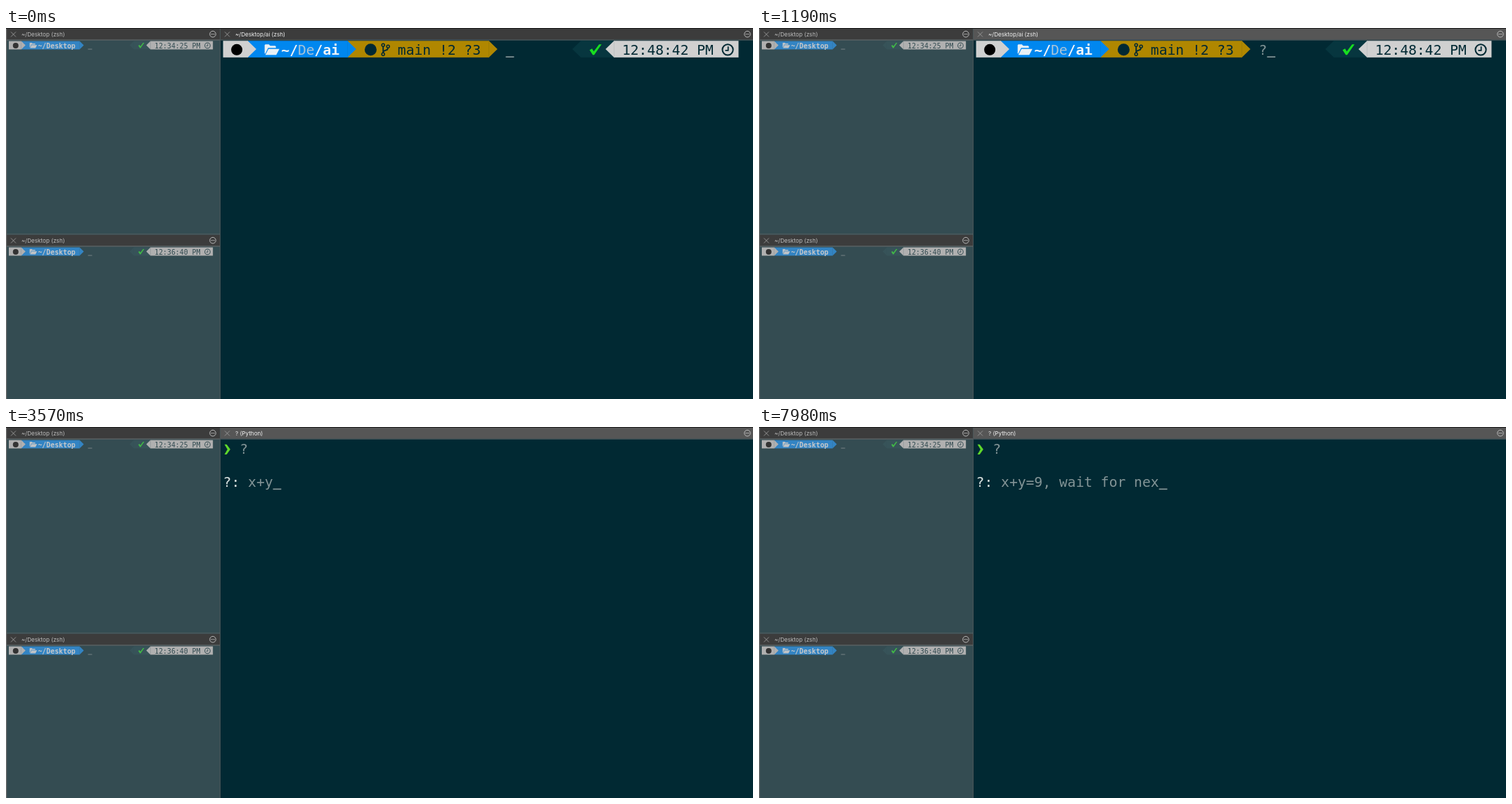
Animation of 1062x527 px, one loop 8000 ms. Source, as an HTML page with a canvas:

```html
<!DOCTYPE html>
<html lang="en">
<head>
<meta charset="utf-8">
<title>Terminal panes</title>
<style>
html, body { margin: 0; width: 100%; height: 100%; overflow: hidden; background: #012933; }
canvas { display: block; }
</style>
</head>
<body>
<canvas id="stage" width="1062" height="527"></canvas>
<script>
const ctx = document.getElementById('stage').getContext('2d');
const LOOP = 8000, COL = 11.82, ROW = 23.6;
const BG = '#012933', LIGHT = '#d0d0d0', BLUE = '#0087ef', GOLD = '#b08700', TEAL = '#07363f', GREY = '#839496';

// Typed line and the moment each character lands
const line = 'x+y=9, wait for nex';
const keyTimes = [2450, 3080, 3570, 4060, 4340, 4970, 5110, 5390, 5880, 6090,
  6230, 6440, 6580, 6720, 6790, 7280, 7490, 7630, 7980];

function rect(x, y, w, h, color) {
  ctx.fillStyle = color;
  ctx.fillRect(x, y, w, h);
}

function polygon(color, ...points) {
  ctx.fillStyle = color;
  ctx.beginPath();
  for (let i = 0; i < points.length; i += 2) ctx.lineTo(points[i], points[i + 1]);
  ctx.fill();
}

function stroke(color, width, ...points) {
  ctx.strokeStyle = color;
  ctx.lineWidth = width;
  ctx.beginPath();
  for (let i = 0; i < points.length; i += 2) ctx.lineTo(points[i], points[i + 1]);
  ctx.stroke();
}

function disc(x, y, r, color) {
  ctx.fillStyle = color;
  ctx.beginPath();
  ctx.arc(x, y, r, 0, 7);
  ctx.fill();
}

function ring(x, y, r, color, width) {
  ctx.strokeStyle = color;
  ctx.lineWidth = width;
  ctx.beginPath();
  ctx.arc(x, y, r, 0, 7);
  ctx.stroke();
}

// Terminal cell text; the origin is the top left of the pane's first cell
function mono(text, col, row, color, weight = 'normal') {
  ctx.font = weight + ' 19.64px "DejaVu Sans Mono", monospace';
  ctx.fillStyle = color;
  ctx.fillText(text, col * COL, row * ROW + 19.8);
}

function cursor(col, row) {
  rect(col * COL, row * ROW + 22, COL, 1.7, GREY);
}

// Segment with an arrow tip at its right (dir 1) or left (dir -1) end
function segment(from, to, color, dir) {
  rect(from * COL, 0, (to - from) * COL, ROW, color);
  const edge = (dir > 0 ? to : from) * COL;
  polygon(color, edge - dir * .3, 0, edge + dir * COL, ROW / 2, edge - dir * .3, ROW);
}

function folder(x) {
  polygon('#e8f0f6', x, 18, x, 6, x + 1, 5, x + 6, 5, x + 8, 7, x + 15, 7, x + 16, 8, x + 16, 10, x + 5, 10, x + 1, 18);
  polygon('#e8f0f6', x + 1, 20, x + 5.5, 11.5, x + 21, 11.5, x + 16.5, 20);
}

function branch(x) {
  ring(x + 3, 6, 2, BG, 1.5);
  ring(x + 3, 19, 2, BG, 1.5);
  ring(x + 10, 8, 2, BG, 1.5);
  stroke(BG, 1.8, x + 3, 8, x + 3, 17);
  stroke(BG, 1.8, x + 10, 10, x + 9, 12.5, x + 4, 14.5, x + 3, 17);
}

function prompt(git, rightCol, time) {
  const pathEnd = git ? 15 : 17;
  if (git) segment(pathEnd, 32, GOLD, 1);
  segment(3, pathEnd, BLUE, 1);
  segment(0, 3, LIGHT, 1);
  disc(19.5, 12.6, 8, '#000');
  folder(5 * COL);
  if (git) {
    mono('~/', 7, 0, '#f0f4f8', 'bold');
    mono('De', 9, 0, '#a9c4d8');
    mono('/ai', 11, 0, '#f0f4f8', 'bold');
    disc(17.75 * COL, 12.6, 8.5, BG);
    branch(19 * COL);
    mono('main !2 ?3', 21, 0, BG);
  } else {
    mono('~/Desktop', 7, 0, '#f0f4f8', 'bold');
  }

  const r = rightCol, x = (r + 2) * COL;
  segment(r + 1, r + 5, TEAL, -1);
  segment(r + 5, r + 20, LIGHT, -1);
  polygon('#18df20', x + 1, 13, x + 4.5, 11, x + 7, 15, x + 14.5, 5, x + 18, 5, x + 7.5, 20, x + 5.5, 20);
  mono(time, r + 6, 0, BG);
  ring((r + 18.7) * COL, 12.6, 7.6, BG, 2);
  stroke(BG, 1.8, (r + 18.7) * COL + .6, 8, (r + 18.7) * COL + .6, 13.6, (r + 18.7) * COL - 3.6, 13.6);
}

function titleBar(x, y, w, title, color, textColor) {
  rect(x, y, w, 15.5, color);
  rect(x, y + 15.5, w, 1, '#6b6b6b');
  stroke('#999', .9, x + 6.5, y + 4.5, x + 13.5, y + 11.5);
  stroke('#999', .9, x + 13.5, y + 4.5, x + 6.5, y + 11.5);
  ctx.font = '8.1px Inter, sans-serif';
  ctx.fillStyle = textColor;
  ctx.fillText(title, x + 21.5, y + 10.7);
  const cx = x + w - 10.5, cy = y + 7.7;
  ring(cx, cy, 4.3, '#c4c4c4', .9);
  for (const dx of [-2, 0, 2]) disc(cx + dx, cy, .7, '#c4c4c4');
}

function inPane(x, y, scale, draw) {
  ctx.save();
  ctx.translate(x, y);
  ctx.scale(scale, scale);
  draw();
  ctx.restore();
}

function sidePane(y, h, time) {
  rect(0, y, 304, h, BG);
  inPane(4, y + 17.6, .501, () => {
    prompt(false, 29, time);
    cursor(19, 0);
  });
  rect(0, y, 304, h, 'rgba(128,128,128,.4)');
  titleBar(.5, y, 304, '~/Desktop (zsh)', '#3c3c3c', '#bdbdbd');
}

function pointer(t) {
  if (t < 70 || t >= 1190) return;
  const x = 674.5, y = 231.7;
  if (t >= 140 && t < 490) {
    ring(x, y, 12.7, '#b5c0c3', 1);
    ring(x, y, 10.6, '#8d9ea3', .9);
  }
  for (const [color, width] of [['#e4e8e9', 2.8], ['#111', 1]]) {
    stroke(color, width, x - 2.7, y - 6, x, y - 4.5, x + 2.7, y - 6);
    stroke(color, width, x - 2.7, y + 6, x, y + 4.5, x + 2.7, y + 6);
    stroke(color, width, x, y - 5, x, y + 5);
    stroke(color, width, x - 1.8, y + 1.5, x + 1.8, y + 1.5);
  }
}

function mainPane(t) {
  if (t < 1540) {
    prompt(true, 42, '12:48:42 PM');
    if (t >= 1190) mono('?', 34, 0, GREY);
    cursor(t < 1190 ? 34 : 35, 0);
    return;
  }
  polygon('#5fd72b', 2, 6.5, 5.2, 6.5, 10.3, 13.5, 5.2, 20.7, 2, 20.7, 6.2, 13.5);
  mono('?', 2, 0, GREY);
  if (t < 1610) cursor(3, 0);
  else if (t < 1960) cursor(0, 1);
  else {
    const typed = keyTimes.filter(k => k <= t).length;
    mono('?:', 0, 2, '#dbe3e1');
    mono(line.slice(0, typed), 3, 2, GREY);
    cursor(3 + typed, 2);
  }
}

function render(t) {
  rect(0, 0, 1062, 527, BG);
  sidePane(1, 292, '12:34:25 PM');
  sidePane(294, 233, '12:36:40 PM');
  const title = t < 1540 ? '~/Desktop/ai (zsh)' : t < 2380 ? '? (zsh)' : '? (Python)';
  titleBar(304.5, 1, 760, title, t < 210 ? '#3c3c3c' : '#565656', '#f2f2f2');
  rect(0, 0, 1062, 1, '#1c1c1c');
  rect(0, 292.6, 304, 1, '#6b6b6b');
  rect(0, 1, 1.2, 526, '#6b6b6b');
  rect(304, 1, 1, 526, '#4a5558');
  inPane(308.6, 18.2, 1, () => mainPane(t));
  pointer(t);
}

const start = performance.now();
function tick() {
  render((performance.now() - start) % LOOP);
  requestAnimationFrame(tick);
}
tick();
</script>
</body>
</html>
```
